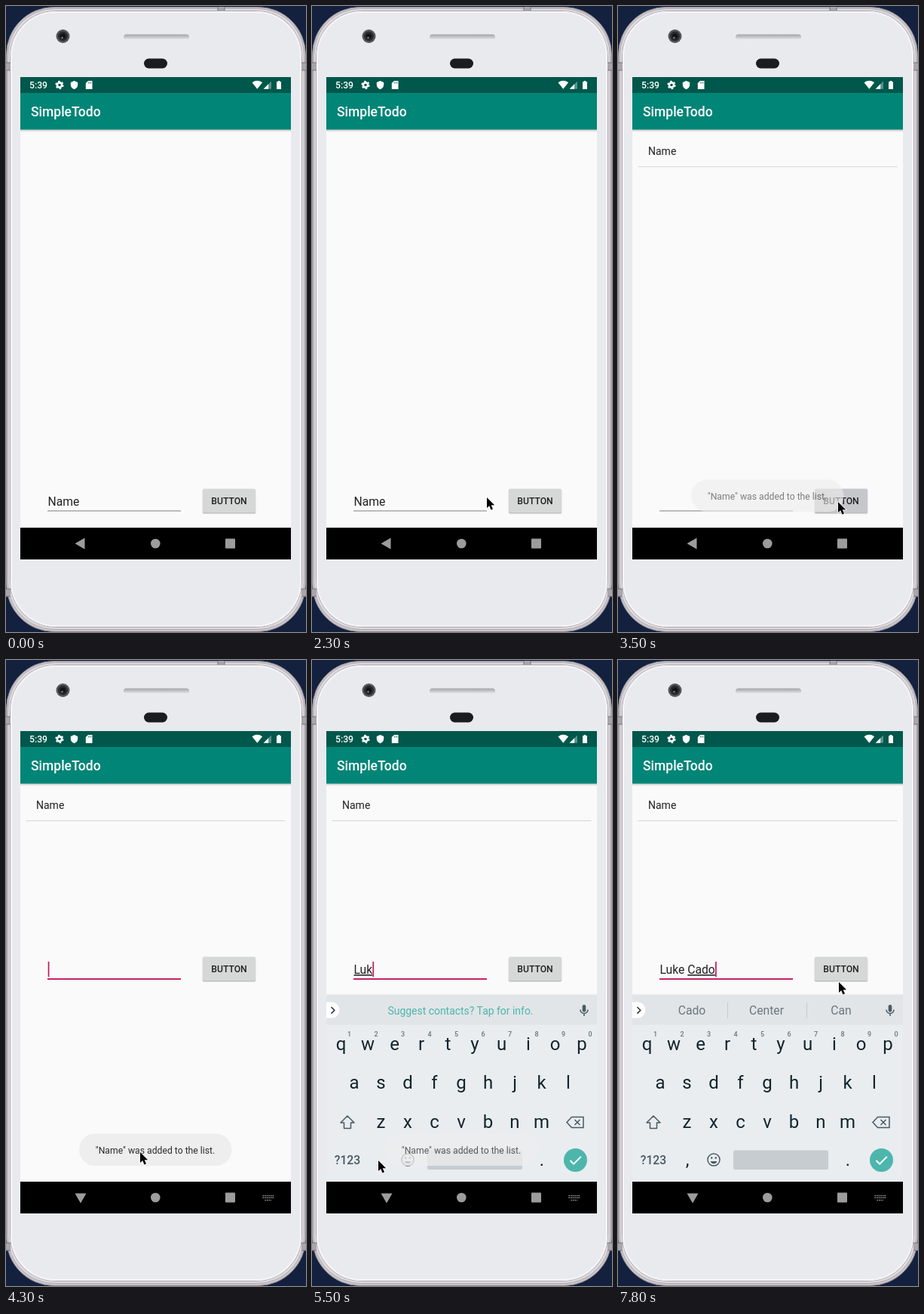
These frames come from a looping animation (398 by 828 pixels, 8000 ms). An HTML page:

```html
<!DOCTYPE html>
<html lang="en">
<head>
<meta charset="utf-8">
<title>Todo app demo</title>
<style>
html, body { margin: 0; width: 100%; height: 100%; overflow: hidden; background: #13213f; }
svg { display: block; width: 398px; height: 828px; font-family: Roboto, "Noto Sans", sans-serif; }
text { white-space: pre; }
.mid { text-anchor: middle; }
.med { font-weight: 500; }
.key { font-size: 24px; fill: #14242c; }
.digit { font-size: 9px; font-weight: 500; fill: #66757d; }
.word { font-size: 15.7px; fill: #6b777d; }
.line { fill: none; stroke: #4a5a63; stroke-width: 1.5; }
#typing { text-decoration: underline; text-decoration-thickness: 1px; }
</style>
</head>
<body>
<svg viewBox="0 0 398 828">
  <defs>
    <linearGradient id="slot" x2="0" y2="1">
      <stop stop-color="#a3a4a8"/><stop offset=".5" stop-color="#c6c7cb"/><stop offset="1" stop-color="#f0f0f2"/>
    </linearGradient>
    <linearGradient id="shade" x2="0" y2="1">
      <stop stop-opacity=".22"/><stop offset="1" stop-opacity="0"/>
    </linearGradient>
  </defs>

  <!-- Phone body -->
  <rect x=".5" y="1.5" width="397" height="826" rx="63" fill="#c9c4c8" stroke="#8f8b91"/>
  <rect x="2.5" y="3.5" width="393" height="821" rx="62" fill="#dedade" stroke="#b2adb2"/>
  <rect x="5.5" y="6.5" width="387" height="815" rx="60" fill="#e9eaee" stroke="#a9a6ac"/>
  <rect x="7" y="8" width="384" height="812" rx="59" fill="none" stroke="#f5f5f7" stroke-width="2"/>
  <path d="M0 75h6v10H0zM392 75h6v10h-6zM0 771h6v10H0zM392 771h6v10h-6zM281 1h9v5h-9z" fill="#aaa5aa"/>
  <path d="M0 75h6M0 85h6M392 75h6M392 85h6M0 771h6M0 781h6M392 771h6M392 781h6M281 1v5M290 1v5" stroke="#77747a"/>
  <circle cx="75.5" cy="40" r="9" fill="#56575b"/>
  <circle cx="75.5" cy="40" r="6.5" fill="#2a2b2f"/>
  <circle cx="75.5" cy="40" r="3.5" fill="#111216"/>
  <circle cx="74.5" cy="42" r="1.3" fill="#777b80"/>
  <rect x="156" y="37.5" width="87" height="7.5" rx="3.7" fill="url(#slot)"/>
  <rect x="183" y="69.5" width="31" height="13" rx="6.5" fill="#1b1c1f"/>

  <!-- App bars -->
  <rect x="19" y="94" width="359" height="638" fill="#fafafa"/>
  <rect x="19" y="163" width="359" height="4" fill="url(#shade)"/>
  <rect x="19" y="115" width="359" height="48.5" fill="#008577"/>
  <rect x="19" y="94" width="359" height="21" fill="#00574b"/>
  <g fill="#fff">
    <text x="31" y="109" font-size="12.2" class="med">5:39</text>
    <text x="33" y="146" font-size="17.5" class="med">SimpleTodo</text>
    <circle cx="71" cy="104.5" r="3.1" fill="none" stroke="#fff" stroke-width="2.6"/>
    <circle cx="71" cy="104.5" r="4.9" fill="none" stroke="#fff" stroke-width="1.5" stroke-dasharray="2.6 2.53"/>
    <path d="M90.500 99l4.700 2v3.300c0 2.800-2 5-4.700 6-2.700-1-4.700-3.200-4.700-6V101z"/>
    <path d="M109 99h5.500v11h-8.700v-8z"/>
    <path d="M326.500 101.200q6.800-4.700 13.600 0l-6.800 8.600z"/>
    <path d="M352 99.500v10.300h-10.300z" opacity=".35"/>
    <path d="M348.200 103.300v6.500h-6.500z"/>
    <path d="M359 100.300h1.700v-1.400h2.600v1.400h1.700v9.700h-6z"/>
  </g>
  <path d="M109.500 100.500v2M111.200 100.500v2M112.900 100.500v2" stroke="#00574b" stroke-width=".7"/>

  <g id="item">
    <text x="40" y="197" font-size="14" fill="#212121">Name</text>
    <rect x="26.500" y="212" width="344" height="1.200" fill="#dadada"/>
  </g>

  <!-- Entry row -->
  <g id="entry">
    <rect id="rule" x="55" width="177"/>
    <text id="field" x="55.500" y="661" font-size="15.7" fill="#212121"><tspan id="done"></tspan><tspan id="typing"></tspan></text>
    <rect id="caret" y="645" width="1.700" height="20" fill="#c2185b"/>
    <rect x="260.500" y="639.500" width="71" height="32.500" rx="2.500" opacity=".12"/>
    <rect x="261" y="639" width="70" height="32" rx="2" opacity=".14"/>
    <rect id="button" x="261" y="638.500" width="70" height="31.500" rx="2"/>
    <text x="296" y="659" font-size="12.2" class="mid med" fill="#212121">BUTTON</text>
  </g>

  <!-- Keyboard -->
  <g id="keyboard">
    <rect x="19" y="441.500" width="359" height="2" fill="#f0f1f2"/>
    <rect x="19" y="443" width="359" height="247" fill="#e9edf0"/>
    <rect x="19" y="443" width="359" height="39.500" fill="#e1e5e8"/>
    <path d="M19 452.500h7a10.500 10.500 0 0 1 0 21h-7z" fill="#fff"/>
    <path d="M25.500 459l4.300 4.300-4.300 4.300" class="line" style="stroke:#263238"/>
    <rect x="358.700" y="456" width="4.600" height="9.500" rx="2.300" fill="#4a5a63"/>
    <path d="M356 462.500a5 5 0 0 0 10 0M361 467.500v3.500" class="line"/>
    <text id="hint" x="197" y="468.500" font-size="13.950" class="mid" fill="#4db6ac">Suggest contacts? Tap for info.</text>
    <g id="words" class="mid word">
      <path d="M145.500 453v21M250.500 453v21" stroke="#c5cbcf"/>
      <text x="98" y="469"></text><text x="197" y="469"></text><text x="296" y="469"></text>
    </g>
    <g id="keys" class="mid"></g>
    <path d="M47 603l-9 9h4.500v7.500h9V612H56z" class="line" stroke-linejoin="round"/>
    <path d="M344.500 604.500H360v14h-15.500l-6.500-7zM348.500 608l7 7M355.500 608l-7 7" class="line"/>
    <text x="47" y="666.500" font-size="15.700" class="mid med" fill="#4a5a63">?123</text>
    <circle cx="127" cy="661" r="8" class="line"/>
    <path d="M122.700 663a4.500 4.500 0 0 0 8.600 0z" fill="#4a5a63"/>
    <path d="M124.200 658.500h.1M129.700 658.500h.1" class="line" style="stroke-width:2.400" stroke-linecap="round"/>
    <rect x="153" y="648.500" width="126" height="25.500" rx="2.500" fill="#c7ccd0"/>
    <circle cx="349.500" cy="661.500" r="15.500" fill="#4db6ac"/>
    <path d="M342.500 662l4.700 4.700 9.600-9.800" class="line" style="stroke:#fff;stroke-width:2"/>
  </g>

  <!-- Navigation bar -->
  <rect x="19" y="690" width="359" height="42" fill="#000"/>
  <g fill="#9c9c9c">
    <path id="back"/>
    <circle cx="198.300" cy="711" r="6.300"/>
    <rect x="291" y="704.500" width="13" height="13" rx=".8"/>
    <path id="switch" d="M340.500 708.500H355M340.500 711.200H355M343.500 714.500h8.500" stroke="#9c9c9c" stroke-width="1.500" stroke-dasharray="1.500 1.100"/>
  </g>

  <g id="toast">
    <rect x="97" y="626.500" width="202.500" height="42.500" rx="21" fill="#eee"/>
    <text x="198" y="652.500" font-size="12.200" class="mid" fill="#2c2c2c">"Name" was added to the list.</text>
  </g>
  <path id="pointer" d="M0 0v14l3.200-3 2.300 5.400 2.500-1.100-2.300-5.100h4.500z" stroke="#fff" stroke-width="1.400" paint-order="stroke"/>
</svg>

<script>
const LOOP = 8000;
const $ = id => document.getElementById(id);
const show = (id, on) => $(id).style.display = on ? "" : "none";

// Every track is a list of [time, value...] steps; each value holds until the next.
const at = (track, t) => track.findLast(step => step[0] <= t);

const pointer = [
  [0, -40, -40], [300, 205, 86], [800, 180, 230], [1000, 147, 379],
  [1300, 225, 520], [1500, 306, 647], [1800, 288, 653], [2300, 232, 650],
  [2500, 177, 658], [2800, 235, 656], [3000, 291, 654], [3300, 292, 656],
  [3800, 235, 653], [4000, 178, 651], [4500, 164, 655], [4800, 110, 660],
  [5000, 88, 662], [7000, 89, 661], [7300, 341, 480], [7500, 293, 426]
];
// Finished text, then the underlined word in progress.
const entry = [
  [0, "Name", ""], [3500, "", ""], [5000, "", "L"], [5300, "", "Lu"], [5500, "", "Luk"],
  [5800, "", "Luke"], [6000, "Luke ", ""], [6300, "Luke ", "Ca"], [6500, "Luke ", "Cado"]
];
const suggestions = [
  [0], [5800, "Luke", "Look", "Like"], [6000, "and", "is", "was"],
  [6300, "Can", "Call", "Come"], [6500, "Cado", "Center", "Can"]
];
const toast = [[0, 0], [3500, .6], [3800, 1], [5500, .75], [5800, 0]];

function addText(cls, x, y, text) {
  const el = document.createElementNS("http://www.w3.org/2000/svg", "text");
  el.setAttribute("class", cls);
  el.setAttribute("x", x);
  el.setAttribute("y", y);
  el.textContent = text;
  $("keys").append(el);
}

[["qwertyuiop", 38.500, 516], ["asdfghjkl", 56, 567], ["zxcvbnm", 91.500, 618.500]].forEach(([row, x, y], r) =>
  [...row].forEach((char, i) => {
    addText("key", x + i * 35.500, y, char);
    if (!r) addText("digit", x + 11 + i * 35.500, 498, (i + 1) % 10);
  }));
addText("key", 92, 669, ",");
addText("key", 305, 669, ".");

function draw(t) {
  const focused = t >= 4300;
  const [, x, y] = at(pointer, t);
  const [, done, typing] = at(entry, t);
  const words = at(suggestions, t).slice(1);

  $("pointer").setAttribute("transform", `translate(${x} ${y})`);
  $("entry").setAttribute("transform", `translate(0 ${focused ? -246 : 0})`);
  $("done").textContent = done;
  $("typing").textContent = typing;
  $("caret").setAttribute("x", 55.700 + $("field").getComputedTextLength());
  show("caret", focused && !(t >= 7000 && t < 7300));

  $("rule").setAttribute("y", focused ? 667 : 667.300);
  $("rule").setAttribute("height", focused ? 1.900 : 1.100);
  $("rule").setAttribute("fill", focused ? "#c2185b" : "#8c8c8c");
  $("button").setAttribute("fill", t >= 3300 && t < 3800 ? "#c6c7ca" : "#d6d7d7");

  show("item", t >= 3500);
  show("keyboard", t >= 4500);
  show("hint", !words.length);
  show("words", words.length);
  $("words").querySelectorAll("text").forEach((el, i) => el.textContent = words[i] || "");
  $("toast").setAttribute("opacity", at(toast, t)[1]);
  $("back").setAttribute("d", focused ? "M91.500 705.500h15l-7.500 13z" : "M104.500 703.500v15l-13-7.500z");
  show("switch", focused);
}

const start = performance.now();
function tick() {
  draw((performance.now() - start) % LOOP);
  requestAnimationFrame(tick);
}
tick();
</script>
</body>
</html>
```
